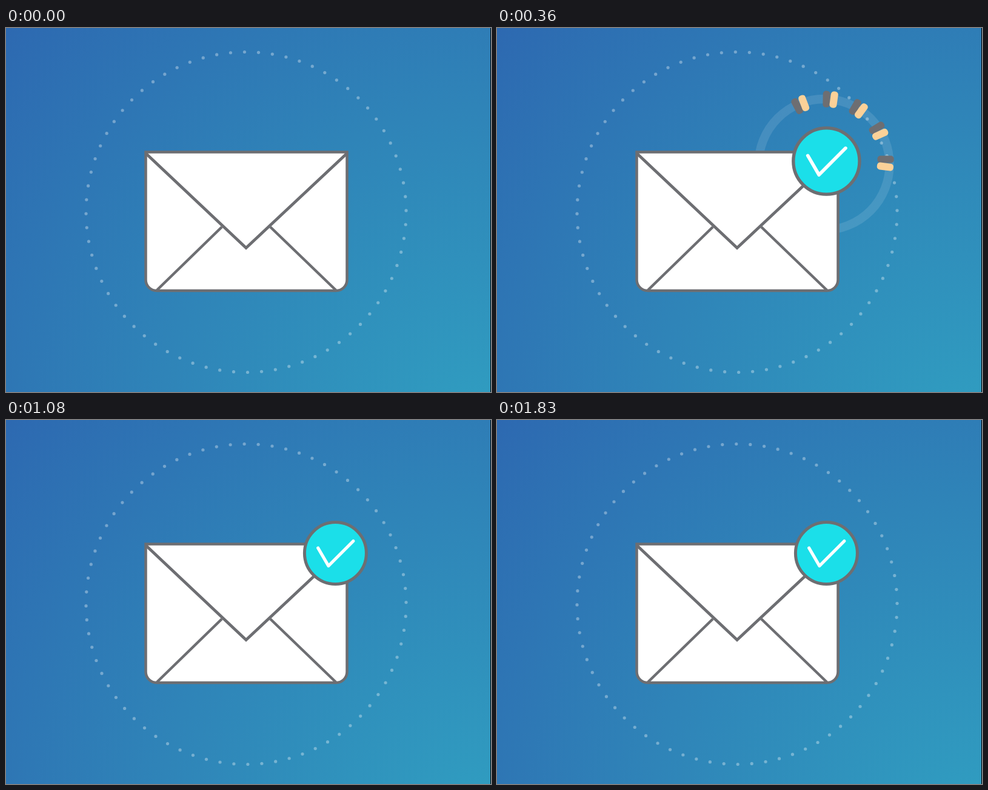
Write an HTML page with a canvas that moves like this. It is 800 by 600 pixels and loops after 1.86 s.

```html
<!DOCTYPE html>
<html lang="en">
<head>
<meta charset="utf-8">
<title>Message delivered</title>
<style>
  html, body { margin: 0; width: 100%; height: 100%; overflow: hidden; }
  canvas { display: block; }
</style>
</head>
<body>
<canvas id="stage" width="800" height="600"></canvas>
<script>
const c = document.getElementById('stage').getContext('2d');
const LOOP = 1860, STEP = 30;
const GREY = '#6d6e72', PEACH = '#fbd198', CYAN = '#1bdfe9';
const RAYS = [-21, 8, 36.5, 65.5, 97];
const TAU = Math.PI * 2, rad = deg => deg * Math.PI / 180;

const progress = (t, from, to) => Math.min(1, Math.max(0, (t - from) / (to - from)));
const smooth = p => p * p * (3 - 2 * p);
const easeOut = p => 1 - (1 - p) ** 2;

const sky = c.createRadialGradient(800, 680, 0, 800, 680, 1052);
sky.addColorStop(0, '#309fc1');
sky.addColorStop(0.52, '#2f84b8');
sky.addColorStop(1, '#2d69b1');

function line(points, width, color = GREY) {
  c.beginPath();
  points.forEach(([x, y]) => c.lineTo(x, y));
  c.lineWidth = width;
  c.strokeStyle = color;
  c.stroke();
}

function disc(x, y, r) {
  c.beginPath();
  c.arc(x, y, r, 0, TAU);
}

function background() {
  c.fillStyle = sky;
  c.fillRect(0, 0, 800, 600);
  c.fillStyle = '#000';
  c.fillRect(799, 0, 1, 600);
}

function dots(t) {
  const turn = -0.55 + t * 0.013817;
  c.fillStyle = 'rgba(255,255,255,.34)';
  for (let i = 0; i < 72; i++) {
    const a = rad(i * 5 + turn);
    disc(396 + 264 * Math.sin(a), 303.5 - 264 * Math.cos(a), 2.6);
    c.fill();
  }
}

function ring(t) {
  const p = progress(t, 90, 420);
  if (p <= 0 || p >= 1) return;
  disc(539.5, 225, 50 + 60 * easeOut(p));
  c.lineWidth = 79 * (1 - p);
  c.strokeStyle = `rgba(255,255,255,${0.6 * (1 - p)})`;
  c.stroke();
}

function envelope() {
  c.beginPath();
  c.moveTo(230.5, 204.5);
  c.lineTo(562.5, 204.5);
  c.arcTo(562.5, 433, 540, 433, 18);
  c.arcTo(230.5, 433, 230.5, 400, 18);
  c.closePath();
  c.fillStyle = '#fff';
  c.fill();
  c.lineWidth = 4.5;
  c.strokeStyle = GREY;
  c.stroke();
  line([[249, 432], [356, 328]], 4.5);
  line([[544, 432], [436, 328]], 4.5);
  line([[231, 207], [396, 362.5], [562, 207]], 4.8);
}

function ray(angle, tail, head, color) {
  c.save();
  c.translate(541.8, 216.5);
  c.rotate(rad(angle));
  c.beginPath();
  c.roundRect(-6, -head, 12, head - tail, Math.min(5, (head - tail) / 2));
  c.fillStyle = color;
  c.fill();
  c.restore();
}

function burst(t) {
  const p = progress(t, 120, 570);
  if (p <= 0 || p >= 1) return;
  const tail = 55 + 74 * p ** 1.4, head = 55 + 74 * easeOut(p);
  for (const a of RAYS) {
    ray(a - 7, tail, head, GREY);
    ray(a, tail, head, PEACH);
  }
}

function badge(t) {
  const scale = 1.2 * smooth(progress(t, 30, 270)) - 0.2 * smooth(progress(t, 270, 420));
  if (scale <= 0) return;
  c.save();
  c.translate(543.4, 219.5);
  c.scale(scale, scale);
  disc(0, 0, 51);
  c.fillStyle = CYAN;
  c.fill();
  c.lineWidth = 5;
  c.strokeStyle = GREY;
  c.stroke();
  c.lineCap = c.lineJoin = 'round';
  line([[-28.7, -8.5], [-11.5, 21], [29.5, -20]], 5.2, '#fff');
  c.restore();
}

function frame() {
  const t = Math.floor(performance.now() % LOOP / STEP) * STEP;
  background();
  dots(t);
  ring(t);
  envelope();
  burst(t);
  badge(t);
  requestAnimationFrame(frame);
}
frame();
</script>
</body>
</html>
```
